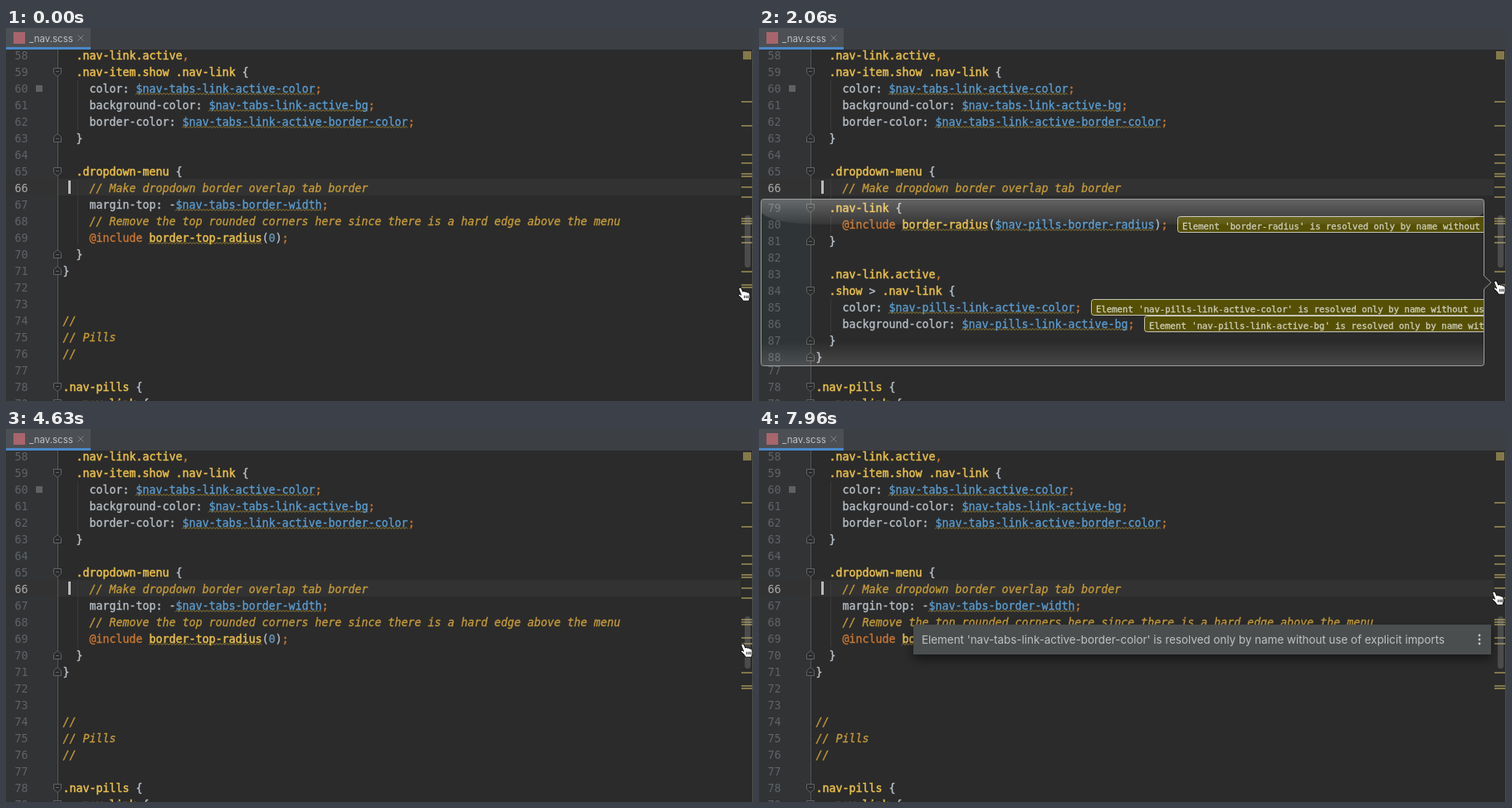
An HTML page that plays this animation: 900x450 px, repeating every 8 s.

```html
<!DOCTYPE html>
<html lang="en">
<head>
<meta charset="utf-8">
<title>Editor lens</title>
<style>
html, body { margin: 0; width: 100%; height: 100%; overflow: hidden; background: #2b2b2b; }
svg { display: block; }
.code text { font: 13.29px "DejaVu Sans Mono", monospace; color: #b9c0c8; white-space: pre; }
.code text, .code tspan { fill: currentColor; stroke: currentColor; stroke-width: .3; }
.code .num { color: #606366; stroke: none; }
.code .now { color: #a9a9a9; }
.code .rem { color: #c59b38; font-style: italic; }
.code .key, .code .end { color: #cc7832; }
.code .var { color: #5b9dd0; }
.code .fn, .code .sel { color: #e6bd4a; stroke-width: .5; }
.code .lit { color: #6897bb; }
.code .hint { color: #cfcfba; font-size: 10.65px; }
.ui { font-family: Inter, "Open Sans", sans-serif; fill: #bfc1c3; }
.tip { filter: drop-shadow(0 6px 6px rgba(0, 0, 0, .45)); }
</style>
</head>
<body>
<svg id="stage" width="900" height="450" viewBox="0 0 900 450" xmlns="http://www.w3.org/2000/svg"></svg>
<script>
const LOOP = 8000, FIRST = 58, ROW = 20, COL = 8, LEFT = 68.5;

const source = `  .nav-link.active,
  .nav-item.show .nav-link {
    color: $nav-tabs-link-active-color;
    background-color: $nav-tabs-link-active-bg;
    border-color: $nav-tabs-link-active-border-color;
  }

  .dropdown-menu {
    // Make dropdown border overlap tab border
    margin-top: -$nav-tabs-border-width;
    // Remove the top rounded corners here since there is a hard edge above the menu
    @include border-top-radius(0);
  }
}


//
// Pills
//

.nav-pills {
  .nav-link {
    @include border-radius($nav-pills-border-radius);
  }

  .nav-link.active,
  .show > .nav-link {
    color: $nav-pills-link-active-color;
    background-color: $nav-pills-link-active-bg;
  }
}


`.split('\n');

const message = name => `Element '${name}' is resolved only by name without use of explicit imports`;
const TOKEN = /(@\w+)|(\$[\w-]+)|([\w-]+(?=\())|(\.[\w-]+)|(\d)|([;,])|[\w-]+:|\S/g;
const KINDS = ['key', 'var', 'fn', 'sel', 'lit', 'end'];
const escape = s => s.replace(/>/g, '&gt;');

function wave(x, width) {
  return `<path d="M${x} 7.5${'l2 -2l2 2'.repeat(width / 4)}" fill="none" stroke="#a38b35" stroke-width=".9"/>`;
}

function fold(up) {
  return `<path d="M57.5 -4.5h9v6l-4.5 4l-4.5 -4zM60 -.5h4" transform="scale(1 ${up ? -1 : 1})" fill="#2b2b2b" stroke="#606366"/>`;
}

function hint(x, name) {
  return `<rect x="${x}" y="-9.5" width="600" height="19" rx="3" fill="#565005" stroke="#c4c4b4"/>
    <text class="hint" x="${x + 5.5}" y="5.5">${message(name)}</text>`;
}

// One editor row, drawn around its vertical centre.
function row(n, hinted) {
  const src = source[n - FIRST] || '';
  const body = src.trim();
  let out = `<text class="num${n === 66 ? ' now' : ''}" x="10.5" y="4.8">${n}</text>`;
  if (/^ {4}/.test(src)) out += '<path d="M86.5 -10v20" stroke="#3b3b3b"/>';
  if (body.endsWith('{')) out += fold(false);
  if (body === '}') out += fold(true);
  if (body.startsWith('//')) {
    return out + `<text class="rem" x="${LEFT + COL * src.indexOf('/')}" y="4.5">${body}</text>`;
  }
  let spans = '', warned = '';
  for (const m of src.matchAll(TOKEN)) {
    const kind = KINDS[m.slice(1).findIndex(Boolean)];
    const x = LEFT + COL * m.index;
    spans += `<tspan x="${x}"${kind ? ` class="${kind}"` : ''}>${escape(m[0])}</tspan>`;
    if (kind === 'var' || kind === 'fn') {
      out += wave(x - .5, COL * m[0].length);
      warned = warned || m[0].replace('$', '');
    }
  }
  out += `<text y="4.5">${spans}</text>`;
  return hinted && warned ? out + hint(LEFT + COL * src.length + 12, warned) : out;
}

function rows(from, to, hinted) {
  let out = '';
  for (let n = from; n <= to; n++) out += `<g transform="translate(0 ${ROW * (n - FIRST)})">${row(n, hinted)}</g>`;
  return `<g class="code">${out}</g>`;
}

function tip(id, x, y, name) {
  return `<g id="${id}" class="tip" opacity="0"><rect x="${x}" y="${y}" width="${882 - x}" height="36" fill="#4b4e4f"/>
    <text class="ui" font-size="13.4" x="${x + 10}" y="${y + 23}">${message(name)}</text>
    ${[13, 18, 23].map(d => `<circle cx="868" cy="${y + d}" r="1.4" fill="#c4c6c8"/>`).join('')}</g>`;
}

// Warned lines: a few above the view, then every listed line that uses a variable or mixin.
const warnedLines = [16, 25, 36, 39, 43, 44, 48, 52];
source.forEach((src, i) => { if (/[$(]/.test(src)) warnedLines.push(FIRST + i); });
const marks = warnedLines.map(n => `M886 ${Math.round(38 + 3.2 * n)}h14`).join('');

const stage = document.getElementById('stage');
stage.innerHTML = `
<defs>
  <linearGradient id="gloss" x2="0" y2="1"><stop stop-color="#fff" stop-opacity=".27"/><stop offset="1" stop-color="#fff" stop-opacity=".05"/></linearGradient>
  <linearGradient id="shine" x2="0" y2="1"><stop stop-color="#fff" stop-opacity="0"/><stop offset="1" stop-color="#fff" stop-opacity=".14"/></linearGradient>
  <clipPath id="pane"><rect x="2.5" y=".5" width="871" height="201" rx="3"/></clipPath>
</defs>
<rect width="900" height="450" fill="#2b2b2b"/>
<rect width="62" height="450" fill="#313335"/>
<rect y="182" width="885" height="20" fill="#323232"/>
<path d="M62.5 26V450" stroke="#555"/>
<g transform="translate(0 33)">${rows(58, 79, false)}</g>
<rect x="36" y="69" width="8" height="8" fill="#5f6163"/>
<rect x="75" y="184" width="3" height="16" fill="#bbb"/>

<rect width="900" height="26" fill="#3c3f43"/>
<rect width="102" height="26" fill="#4c5055"/>
<rect y="23" width="102" height="3" fill="#4a88c7"/>
<rect x="9" y="5" width="14" height="14" fill="#a8656c"/>
<text class="ui" font-size="11.5" x="28" y="16.5">_nav.scss</text>
<path d="M86.5 8.5l7 7m0 -7l-7 7" stroke="#7d8083"/>

<rect x="888" y="28" width="10" height="10" fill="#84794a"/>
<path d="${marks}" stroke="#81764a" stroke-width="2"/>
<rect x="890" y="226" width="7" height="63" rx="3.5" fill="#a6a6a6" fill-opacity=".27"/>
<path d="M899.5 26V450" stroke="#4f4f4f"/>

<g id="lens" opacity="0">
  <g clip-path="url(#pane)">
    <rect width="874" height="202" fill="#2b2b2b"/>
    <rect width="62" height="202" fill="#2f3436"/>
    <path d="M62.5 0V202" stroke="#555"/>
    <g id="view">${rows(74, 92, true)}</g>
    <path d="M2 0H874V16Q862 30 800 31H75Q14 30 2 16Z" fill="url(#gloss)"/>
    <rect y="172" width="874" height="30" fill="url(#shine)"/>
  </g>
  <path d="M5.5 .5H870.5q3 0 3 3V93l8.500 8l-8.500 8V198.500q0 3 -3 3H5.500q-3 0 -3 -3V3.500q0 -3 3 -3Z" fill="none" stroke="#9c9c9c"/>
</g>
${tip('tipA', 267, 300, 'nav-pills-border-radius')}
${tip('tipB', 186, 236, 'nav-tabs-link-active-border-color')}
<g id="hand"><path transform="scale(1.13)" d="M-5.5 -6.500C-4.500 -7.500 -3.300 -6.800 -2.800 -5.700L-1.500 -2.700C-.8 -3.500 .5 -3.300 1 -2.400C1.800 -3 2.900 -2.600 3.300 -1.700C4.300 -2.200 5.500 -1.500 5.700 -.2C6 2 6.200 4.500 5 7.300H-1.200C-2.300 5 -4.200 3.500 -6 1.800C-6.800 .8 -5.400 -.5 -4.200 .4L-3.400 1L-5.600 -4.300C-6 -5.200 -6 -6 -5.500 -6.500ZM.2 1.500V4.500M2.200 1.500V4.500M4 1.500V4.500" fill="#fff" stroke="#111" stroke-width=".9" stroke-linejoin="round"/></g>`;

// Pointer moves: start, end, x, y, and the power of the ease-out.
const origin = [889, 321];
const moves = [
  [1060, 1430, 890, 319, 1],
  [1660, 2060, 892, 313.3, 1],
  [2900, 3230, 892, 301, 2],
  [4130, 4800, 892, 256, 1],
  [5730, 6530, 893, 236, 4],
  [6560, 7200, 891, 212, 1],
  [7860, 7960, 890, 204, 1]
];

const clamp = v => Math.min(1, Math.max(0, v));
const ramp = (t, from, to) => clamp((t - from) / (to - from));

function pointer(t) {
  let [x, y] = origin;
  for (const [from, to, nx, ny, power] of moves) {
    const f = 1 - (1 - ramp(t, from, to)) ** power;
    x += (nx - x) * f;
    y += (ny - y) * f;
  }
  return [x, y];
}

const $ = id => document.getElementById(id);
const move = (id, x, y) => $(id).setAttribute('transform', `translate(${x} ${y})`);
const show = (id, alpha) => $(id).setAttribute('opacity', alpha);

function draw(t) {
  const [x, y] = pointer(t);
  move('hand', Math.round(x) + .5, Math.round(y));

  // The lens rides with the pointer and scrolls one row per three pixels.
  move('lens', 0, Math.round(y - 107));
  move('view', 0, -Math.round(1507 + (y - 304) * ROW / 3 - ROW * FIRST));

  show('lens', ramp(t, 30, 230) - ramp(t, 3170, 3220));
  show('tipA', ramp(t, 3190, 3230) - ramp(t, 4200, 4260));
  show('tipB', ramp(t, 6400, 6530));
}

const start = performance.now();
function tick() {
  draw((performance.now() - start) % LOOP);
  requestAnimationFrame(tick);
}
tick();
</script>
</body>
</html>
```
